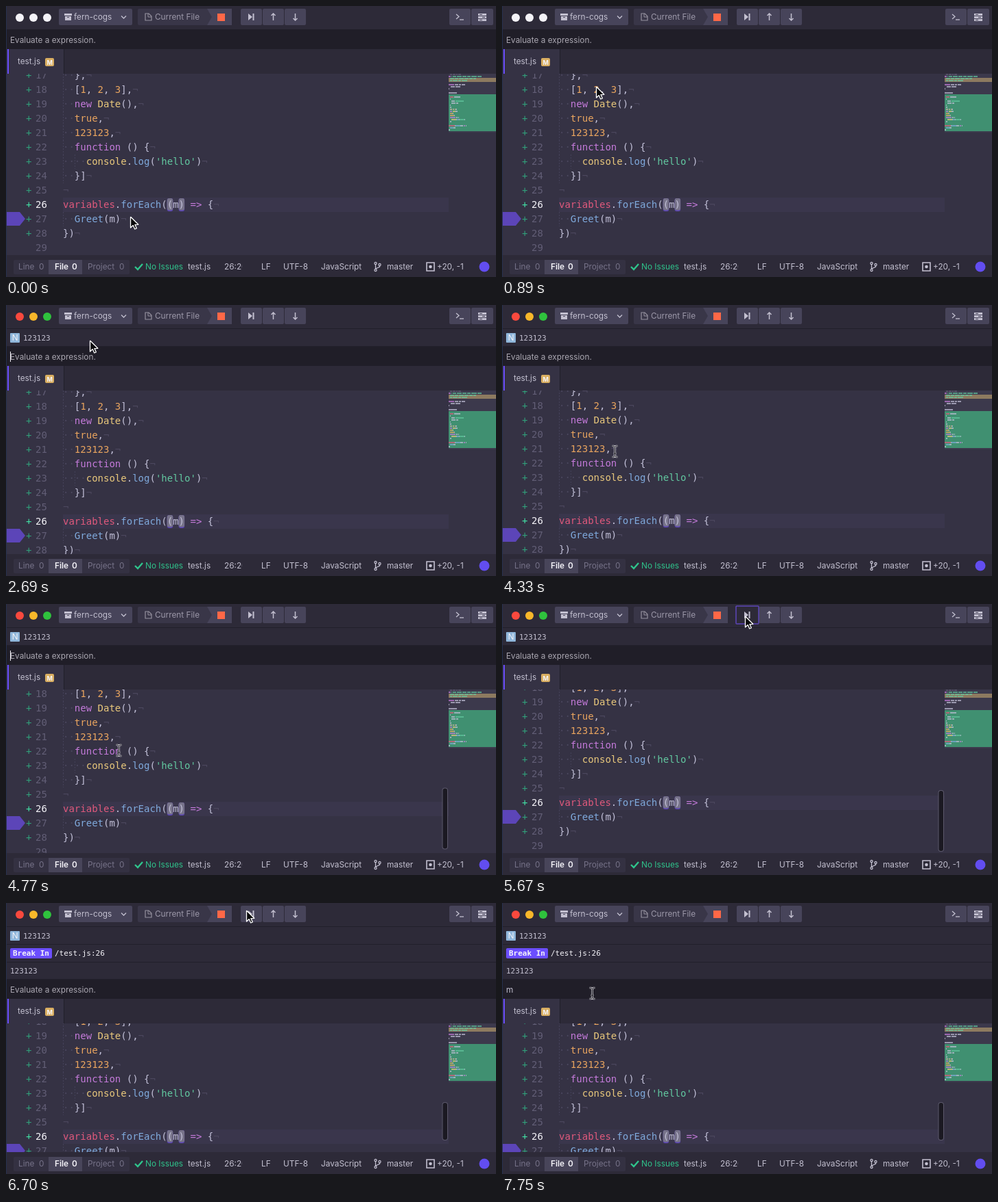
Write an HTML page with a canvas that moves like this. It is 714 px wide and 396 px high and loops after 8 s.

```html
<!DOCTYPE html>
<html lang="en">
<head>
<meta charset="utf-8">
<title>Debug console</title>
<style>
html, body { margin: 0; width: 100%; height: 100%; overflow: hidden; background: #2c2938; }
canvas { display: block; }
</style>
</head>
<body>
<canvas id="stage" width="714" height="396"></canvas>
<script>
const ctx = document.getElementById('stage').getContext('2d');
const W = 714, LOOP = 8000, TICK = 149;
const UI = '11.8px Inter, sans-serif';
const CODE = '14px "DejaVu Sans Mono", monospace';
const LOG = '11px "DejaVu Sans Mono", monospace';
const CHAR = 8.43, LINE = 21, CODE_X = 83, EDITOR_END = 364;

const C = {
  bar: '#2d2a38', edit: '#353244', input: '#201e28', edge: '#211f2a', button: '#47445a', soft: '#393648',
  text: '#c3c0d0', dim: '#625e76', faint: '#4b475e', accent: '#5c45b8', violet: '#6b4eff',
  plain: '#c2c0d8', key: '#c57bdb', num: '#eaa55f', name: '#e9c87c', call: '#7fa9dc', str: '#62c8a0',
  red: '#e0597c', green: '#2fc48c', white: '#f4f3f8'
};

// Each line: alternating colour key and text.
const FIRST = 17;
const code = [
  ['plain', '  },'],
  ['plain', '  [', 'num', '1', 'plain', ', ', 'num', '2', 'plain', ', ', 'num', '3', 'plain', '],'],
  ['key', '  new ', 'name', 'Date', 'plain', '(),'],
  ['num', '  true', 'plain', ','],
  ['num', '  123123', 'plain', ','],
  ['key', '  function', 'plain', ' () {'],
  ['name', '    console', 'plain', '.', 'call', 'log', 'plain', '(', 'str', "'hello'", 'plain', ')'],
  ['plain', '  }]'],
  ['plain', ''],
  ['red', 'variables', 'plain', '.', 'call', 'forEach', 'plain', '((m) ', 'key', '=>', 'plain', ' {'],
  ['call', '  Greet', 'plain', '(m)'],
  ['plain', '})'],
  null
];
const overview = [
  ['dim', '  xxx xxxx xx xxxx'],
  ['key', 'xxx', 'str', ' x xxxxx xxxxxxx xxxxxx xxxxx xxxxxxxx xxxxxx'],
  ['str', '  xxxxxx xxxxx xxxxxxx xxxxxx xxxxx xxxx'],
  ['str', '  xxx xxxxxxx xxxx xxxxxxxx'],
  [],
  ['key', 'xxxxxxxx', 'plain', ' xxxxx xxx xxxxx'],
  ['plain', '   xxxxxx xxxxxxx'],
  ['plain', 'x'], [],
  ['plain', 'xxxxxxxxxxxx'], [],
  ['red', '  xxxxx', 'plain', ' xxxxxxxxx'],
  ['plain', '  x'],
  ['plain', '    xxxxx', 'str', ' xxxxxxxxxxxx'],
  ['plain', '    xxxxxx xxx'],
  ['plain', '  x'],
  ...code.slice(0, -1)
];

// Pointer keys: tick, x, y
const path = [
  [2, 181, 308], [8, 122, 52], [22, 122, 52], [28, 164, 214], [32, 164, 214],
  [37, 354, 18], [40, 354, 18], [43, 350, 11], [44, 350, 11], [46, 131, 132]
];
const caretOn = [[8, 11], [14, 21], [24, 27], [30, 33], [36, 37], [46, 52]];

const clamp = v => Math.max(0, Math.min(1, v));
const smooth = p => p * p * (3 - 2 * p);

function rect(x, y, w, h, color, r = 0) {
  ctx.fillStyle = color;
  ctx.beginPath();
  ctx.roundRect(x, y, w, h, r);
  ctx.fill();
}
function frame(x, y, w, h, color, r = 0, width = 1) {
  ctx.strokeStyle = color;
  ctx.lineWidth = width;
  ctx.beginPath();
  ctx.roundRect(x, y, w, h, r);
  ctx.stroke();
}
function dot(x, y, r, color) {
  ctx.fillStyle = color;
  ctx.beginPath();
  ctx.arc(x, y, r, 0, Math.PI * 2);
  ctx.fill();
}
function trace(points) {
  ctx.beginPath();
  points.forEach(([x, y]) => ctx.lineTo(x, y));
}
function line(points, color, width = 1.5) {
  trace(points);
  ctx.strokeStyle = color;
  ctx.lineWidth = width;
  ctx.stroke();
}
function shape(points, color) {
  trace(points);
  ctx.closePath();
  ctx.fillStyle = color;
  ctx.fill();
}
function text(str, x, midY, color = C.text, font = UI) {
  ctx.font = font;
  ctx.fillStyle = color;
  ctx.fillText(str, x, midY + 4.3);
}
function tokens(row, draw) {
  let col = 0;
  for (let i = 0; i < row.length; i += 2) {
    draw(row[i + 1], col, C[row[i]]);
    col += row[i + 1].length;
  }
  return col;
}

function pointerAt(n) {
  const i = path.findIndex(k => k[0] > n);
  if (i === 0) return path[0].slice(1);
  if (i < 0) return path[path.length - 1].slice(1);
  const [t0, x0, y0] = path[i - 1], [t1, x1, y1] = path[i];
  const p = smooth((n - t0) / (t1 - t0));
  return [Math.round(x0 + (x1 - x0) * p), Math.round(y0 + (y1 - y0) * p)];
}

function drawToolbar(n) {
  rect(0, 0, W, 35, C.bar);
  const lights = n < 8 ? [C.white, C.white, C.white] : ['#f9493e', '#f8b72a', '#2fc23d'];
  lights.forEach((c, i) => dot(20 + i * 20, 17, 6, c));

  rect(77, 4, 107, 24, C.button, 2);
  rect(85, 11, 11, 3, C.text);
  rect(86, 15, 9, 6, C.text);
  rect(89, 16, 3, 1, C.button);
  text('fern-cogs', 99, 16);
  line([[168, 14.5], [171.5, 18], [175, 14.5]], C.text, 1.3);

  rect(192, 4, 137, 24, C.soft, 2);
  shape([[293, 4], [329, 4], [329, 28], [293, 28], [300, 16]], C.button);
  line([[209, 21], [203, 21], [203, 11], [208, 11], [212, 15], [212, 21], [209, 21]], '#96929f', 1.2);
  line([[207, 11], [207, 16], [212, 16]], '#96929f', 1);
  text('Current File', 217, 16, '#9c98a9');
  rect(308, 11, 11, 11, '#ff6847');

  for (let i = 0; i < 3; i++) rect(342 + i * 32, 4, 31, 24, C.button, 2);
  if (n === 37 || n === 38) {
    rect(341, 3, 33, 26, C.bar);
    frame(341, 3, 33, 26, C.accent, 1, 1.5);
  }
  shape([[353, 11], [359, 16], [353, 21]], C.text);
  rect(359.5, 11, 2, 10, C.text);
  [[389.5, 1], [421.5, -1]].forEach(([x, d]) => {
    line([[x, 16 + d * 5], [x, 16 - d * 5]], C.text);
    line([[x - 3, 16 - d * 2], [x, 16 - d * 5], [x + 3, 16 - d * 2]], C.text);
  });

  rect(646, 4, 31, 24, C.button, 2);
  rect(678, 4, 32, 24, C.button, 2);
  line([[656, 12], [660, 15.5], [656, 19]], C.text, 1.3);
  line([[661, 20], [667, 20]], C.text, 1.3);
  for (let i = 0; i < 3; i++) {
    rect(688, 11 + i * 4, 12, 3, C.text);
    rect(690 + i % 2 * 4, 12 + i * 4, 4, 1, C.button);
  }
  rect(0, 34, W, 1, C.edge);
}

function drawConsole(n, shift) {
  rect(0, 35, W, shift, C.bar);
  if (shift) {
    rect(6, 41, 14, 14, '#8fb6da', 1);
    text('N', 8.7, 48, C.white);
    text('123123', 25, 48, C.text, LOG);
    rect(0, 60, W, 1, C.edge);
  }
  if (shift > 26) {
    rect(6, 66, 61, 15, C.violet, 2);
    text('Break In', 10, 73, C.white, 'bold ' + LOG);
    text('/test.js:26', 71, 73, C.white, LOG);
    rect(0, 86, W, 1, C.edge);
    text('123123', 6, 99, C.text, LOG);
    rect(0, 111, W, 1, C.edge);
  }
  const typed = (n >= 14 && n < 17) || n >= 49;
  rect(0, 35 + shift, W, 28, C.input);
  text(typed ? 'm' : 'Evaluate a expression.', 6, 50 + shift, typed ? C.text : '#aaa7b1');
  if (caretOn.some(([a, b]) => n >= a && n < b)) rect(typed ? 16 : 6, 42 + shift, 1, 15, C.white);
}

function drawTabs(top) {
  rect(0, top, W, 36, C.bar);
  rect(2, top, 83, 36, C.edit);
  rect(2, top, 2, 36, C.violet);
  rect(84, top, 1, 36, C.edge);
  text('test.js', 17, top + 18);
  rect(57, top + 13, 13, 12, '#d9ae61', 2);
  text('M', 59.5, top + 18.3, C.white, 'bold 9px Inter, sans-serif');
}

function drawCode(shift, scroll) {
  code.forEach((row, i) => {
    const num = FIRST + i, y = 101 + i * LINE + shift - scroll, active = num === 26;
    if (active) rect(CODE_X, y - 10, 562, LINE, '#3a364c');
    if (num === 27) shape([[1, y - 10], [20, y - 10], [28, y], [20, y + 10], [1, y + 10]], C.accent);
    text(num, 43, y + 0.7, active ? C.white : C.dim, CODE);
    if (!row) return;
    text('+', 29, y + 0.7, active ? '#43e3a6' : '#329f7a', CODE);

    if (active) [18, 20].forEach(col => {
      const x = CODE_X + col * CHAR;
      rect(x, y - 9, 8.5, 19, C.accent, 3);
      rect(x, y - 9, 8.5, 17.5, '#77738a', 3);
    });
    const indent = row[1].length - row[1].trimStart().length;
    for (let col = 0; col < indent; col++) {
      text('·', CODE_X + col * CHAR, y + 0.7, C.faint, CODE);
      if (col % 2 === 0) {
        ctx.setLineDash([2, 2]);
        line([[CODE_X + 0.5 + col * CHAR, y - 10], [CODE_X + 0.5 + col * CHAR, y + 11]], '#45425a', 1);
        ctx.setLineDash([]);
      }
    }
    const end = tokens(row, (s, col, color) => text(s, CODE_X + col * CHAR, y + 0.7, color, CODE));
    text('¬', CODE_X + end * CHAR, y + 0.7, C.faint, CODE);
  });
}

function drawMinimap(top) {
  rect(645, top, 69, 86, '#3c394c');
  rect(645, top + 6, 69, 6, '#8d7a60');
  rect(645, top + 30, 69, 54, '#409071');
  ctx.globalAlpha = 0.7;
  overview.forEach((row, i) => tokens(row, (s, col, color) => {
    [...s].forEach((ch, k) => {
      if (ch !== ' ') rect(645 + col + k, top + i * 3, 1, 2, color);
    });
  }));
  ctx.globalAlpha = 1;
}

function drawEditor(n, shift, scroll) {
  const top = 99 + shift;
  ctx.save();
  ctx.beginPath();
  ctx.rect(0, top, W, EDITOR_END - top);
  ctx.clip();
  rect(0, top, W, EDITOR_END - top, C.edit);
  drawCode(shift, scroll);
  drawMinimap(top);
  if (n >= 31) {
    const [y, h] = shift > 26 ? [291, 56] : [272 - (26 - scroll) * 0.38, 90];
    rect(635.5, y, 8.5, h, '#5b586b', 4);
    rect(636.5, y + 1, 6.5, h - 2, '#1b1922', 3);
  }
  ctx.restore();
}

function drawStatus() {
  const y = 381, gray = '#777389';
  rect(0, EDITOR_END, W, 32, C.bar);
  rect(11, 371, 169, 21, '#343142', 2);
  rect(62, 371, 49, 21, '#48455a');
  text('Line', 18, y, gray);
  text('0', 48, y, gray);
  text('File', 71, y, C.white, '600 ' + UI);
  text('0', 96, y, C.white, '600 ' + UI);
  text('Project', 119, y, gray);
  text('0', 165, y, gray);
  line([[188, 381], [192, 385], [199, 377]], C.green, 2.4);
  text('No Issues', 203, y, C.green);
  text('test.js', 265, y);
  ctx.save();
  ctx.beginPath();
  ctx.rect(318, 370, 26, 22);
  ctx.clip();
  text('26:20', 318, y);
  ctx.restore();
  text('LF', 372, y);
  text('UTF-8', 404, y);
  text('JavaScript', 459, y);
  line([[538.5, 377], [538.5, 386]], C.text, 1.3);
  line([[544.5, 379], [544.5, 381], [538.5, 384]], C.text, 1.3);
  [[538.5, 376], [538.5, 386], [544.5, 378]].forEach(([x, cy]) => {
    dot(x, cy, 2.2, C.text);
    dot(x, cy, 0.9, C.bar);
  });
  text('master', 555, y);
  frame(613, 375, 11, 12, C.text, 0, 1.6);
  dot(618.5, 381, 2.3, C.text);
  text('+20, -1', 628, y);
  dot(697, 381, 7.5, '#624df0');
}

function drawPointer(n) {
  const [x, y] = pointerAt(n);
  const beam = (n >= 8 && n < 18) || n >= 45 || (n >= 23 && n < 39 && y > 125);
  ctx.lineJoin = 'round';
  if (beam) {
    const stroke = (color, w) => {
      line([[x - 3.5, y - 8], [x - 1, y - 8], [x + 0.5, y - 6.5], [x + 2, y - 8], [x + 4.5, y - 8]], color, w);
      line([[x - 3.5, y + 8], [x - 1, y + 8], [x + 0.5, y + 6.5], [x + 2, y + 8], [x + 4.5, y + 8]], color, w);
      line([[x + 0.5, y - 7], [x + 0.5, y + 7]], color, w);
      line([[x - 1.5, y + 3], [x + 2.5, y + 3]], color, w);
    };
    stroke('#c9c7cf', 2.6);
    stroke('#15141a', 1);
  } else {
    const arrow = [[0, 0], [0, 16], [3.7, 12.6], [6.2, 18], [8.8, 16.8], [6.4, 11.6], [11.3, 11.3]]
      .map(([dx, dy]) => [x + 0.5 + dx, y + dy]);
    arrow.push(arrow[0]);
    shape(arrow, '#08080a');
    line(arrow, '#ffffff', 1.3);
  }
  ctx.lineJoin = 'miter';
}

function render(time) {
  const n = Math.floor((time % LOOP + 4) / TICK);
  const shift = n < 17 ? 0 : n < 39 ? 26 : 77;
  const scroll = Math.round(26 * clamp((n - 28) / 5) ** 2);
  drawToolbar(n);
  drawConsole(n, shift);
  drawTabs(63 + shift);
  drawEditor(n, shift, scroll);
  drawStatus();
  rect(0, 0, 1, 396, '#25304d');
  drawPointer(n);
}

let start;
function loop(now) {
  start ??= now;
  render(now - start);
  requestAnimationFrame(loop);
}
render(0);
requestAnimationFrame(loop);
</script>
</body>
</html>
```
